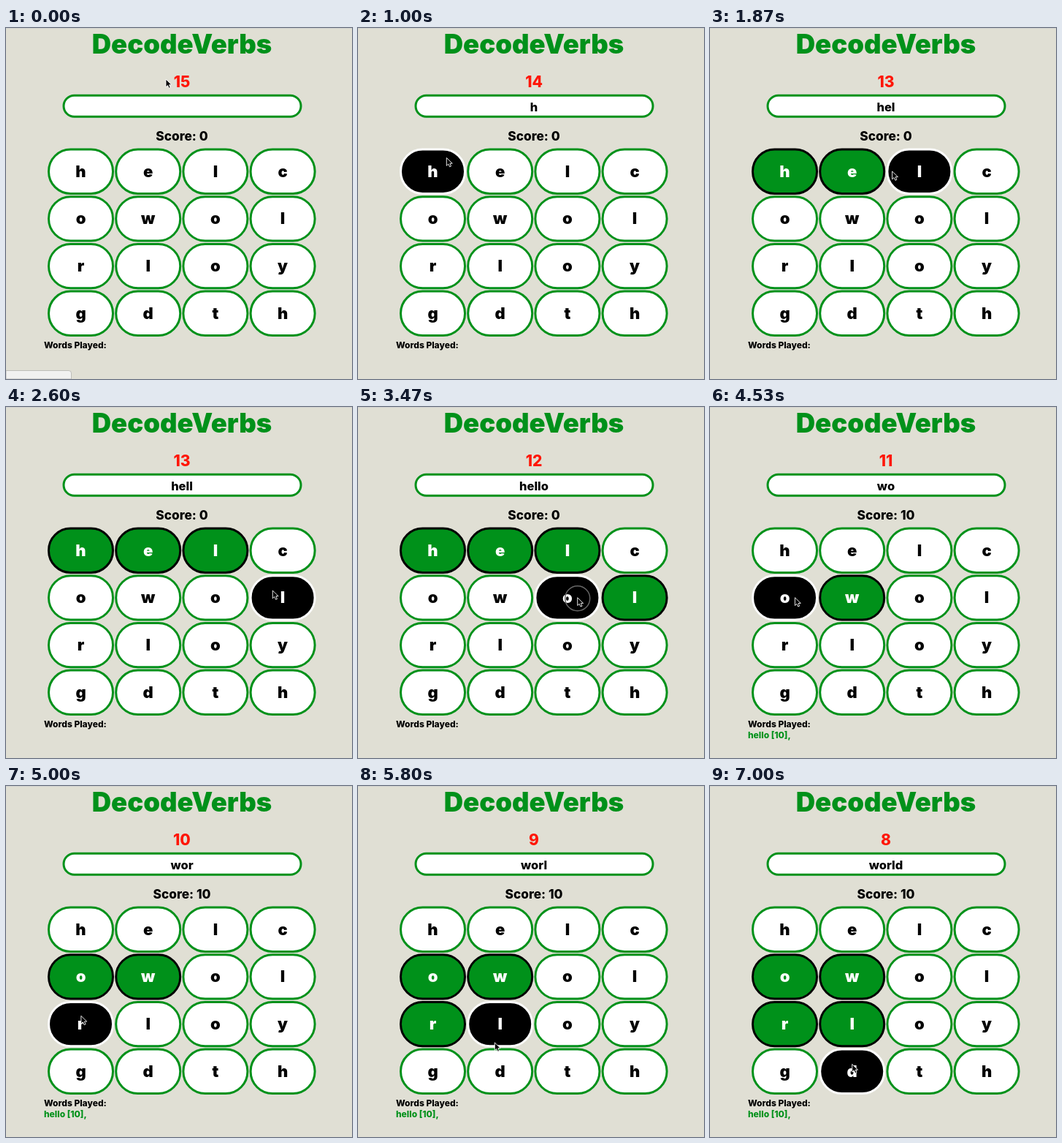
Write an HTML page that moves like this. It is 474x480 px and loops after 7070 ms.

```html
<!DOCTYPE html>
<html lang="en">
<head>
<meta charset="utf-8">
<title>Word game</title>
<style>
  html, body { margin: 0; width: 100%; height: 100%; overflow: hidden; background: #e0dfd4; }
  svg { display: block; width: 100vw; height: 100vh; }
  text { font-family: Inter, "Open Sans", sans-serif; font-weight: 800; text-anchor: middle; }
  .green { fill: #00911a; }
  .box, .tile rect { fill: #fff; stroke: #00911a; stroke-width: 3; }
  .tile text { font-size: 22px; font-weight: 900; }
  .tile.used rect { fill: #00911a; stroke: #000; }
  .tile.hover rect { fill: #000; stroke: #fff; }
  .tile.used text, .tile.hover text { fill: #fff; }
  .small { font-size: 12px; text-anchor: start; }
</style>
</head>
<body>
<svg viewBox="0 0 474 480">
  <rect width="474" height="480" fill="#e0dfd4"/>
  <rect width="474" height="1" fill="#d3d3d0"/>
  <text class="green" x="241" y="35" font-size="36.500" style="font-weight:900">DecodeVerbs</text>
  <text id="timer" x="241" y="80.5" font-size="21" fill="#ff1607"></text>
  <rect class="box" x="79" y="92.3" width="325" height="29" rx="14.5"/>
  <text id="entry" x="241" y="114" font-size="16.5"></text>
  <text id="score" x="241" y="153.5" font-size="17.3"></text>
  <g id="board"></g>
  <text class="small" x="52" y="438">Words Played:</text>
  <text class="small green" id="played" x="52" y="452.5"></text>
  <path id="status" d="M0 468.5H86Q89.5 468.5 89.5 472V480H0Z" fill="#f1f1f0" stroke="#bdbdb9"/>
  <circle id="ring" r="17" fill="none" stroke="#666" stroke-width="1.5"/>
  <path id="cursor" d="M0 0V10.8L2.5 8.5L4.3 12.3L6.2 11.5L4.6 7.7H7.9Z"
        fill="#000" stroke="#fff" stroke-width=".9"/>
</svg>
<script>
  const LOOP = 7070, TICK = 670, SUBMIT = 3610;
  const LETTERS = 'helcowolrloygdth';
  const LEAN = 0.15;  // how far short of a tile's centre the pointer stops
  const LAG = 0.35;   // part of a step between entering a tile and stopping in it
  const $ = id => document.getElementById(id);

  const words = [
    { start: 760, step: 550, route: [0, 1, 2, 7, 6] },
    { start: 3850, step: 510, route: [5, 4, 8, 9, 13] }
  ];

  const tiles = [...LETTERS].map((letter, i) => {
    const x = 102.5 + (i % 4) * 92.2, y = 196 + Math.floor(i / 4) * 64.7;
    const node = document.createElementNS('http://www.w3.org/2000/svg', 'g');
    node.innerHTML = `<rect x="${x - 44}" y="${y - 30}" width="88" height="60.4" rx="30"/>
      <text x="${x}" y="${y + 7.5}">${letter}</text>`;
    $('board').append(node);
    return { x, y, node };
  });

  const mix = (a, b, k) => ({ x: a.x + (b.x - a.x) * k, y: a.y + (b.y - a.y) * k });
  const smooth = k => k * k * (3 - 2 * k);

  // Each visit starts a move that stops on the near side of its tile's centre.
  const home = { x: 219, y: 70 };
  let previous = home;
  const visits = words.flatMap(({ start, step, route }) => route.map((index, i) => {
    const time = start + i * step;
    const stop = mix(tiles[index], previous, LEAN);
    previous = tiles[index];
    return { index, time, step, stop, depart: time - step * (1 - LAG) };
  }));

  function pointerAt(t) {
    return visits.reduce((from, { depart, step, stop }) => {
      const k = Math.min(1, Math.max(0, (t - depart) / step));
      return mix(from, stop, smooth(k));
    }, home);
  }

  function render(t) {
    const submitted = t >= SUBMIT;
    const visited = visits.filter(v => v.time <= t);
    const hovered = visited.at(-1)?.index;
    const word = visited
      .filter(v => (v.time >= SUBMIT) === submitted)
      .map(v => v.index);

    tiles.forEach(({ node }, i) => {
      const state = i === hovered ? 'hover' : word.includes(i) ? 'used' : '';
      node.setAttribute('class', `tile ${state}`);
    });
    $('timer').textContent = 14 - Math.floor((t - TICK) / 1000);
    $('entry').textContent = word.map(i => LETTERS[i]).join('');
    $('score').textContent = `Score: ${submitted ? 10 : 0}`;
    $('played').textContent = submitted ? 'hello [10],' : '';
    $('status').style.display = t < 400 ? '' : 'none';

    const { x, y } = pointerAt(t);
    $('cursor').setAttribute('transform', `translate(${x} ${y})`);
    $('ring').setAttribute('transform', `translate(${x} ${y + 1})`);
    $('ring').style.display = t >= 3400 && t < 3540 ? '' : 'none';
  }

  const start = performance.now();
  function frame() {
    render((performance.now() - start) % LOOP);
    requestAnimationFrame(frame);
  }
  frame();
</script>
</body>
</html>
```
